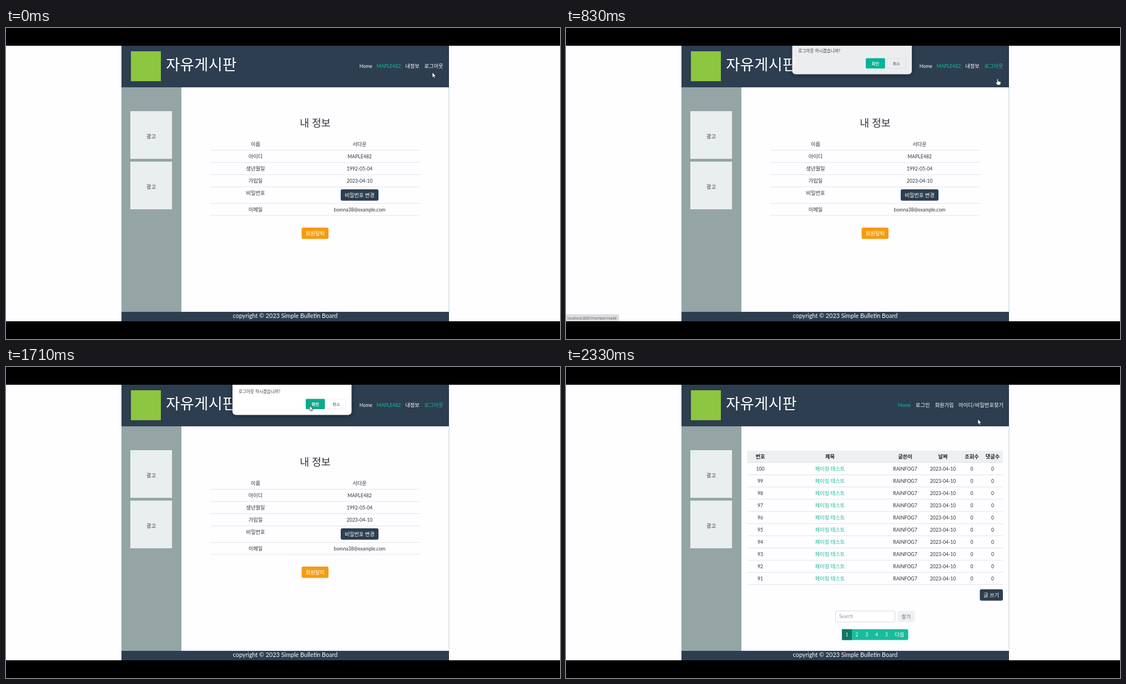
An HTML page for the animation above (2.37 s loop, 998 px wide and 561 px high).

```html
<!DOCTYPE html>
<html lang="ko">
<head>
<meta charset="utf-8">
<title>자유게시판</title>
<style>
html, body { margin: 0; width: 100%; height: 100%; overflow: hidden; background: #000; }
svg { display: block; width: 998px; height: 561px; }
text { font-family: Lato, "Noto Sans CJK KR", "Noto Sans CJK", "Noto Sans KR", sans-serif; white-space: pre; }
#dialog { filter: drop-shadow(0 2px 4px rgba(0, 0, 0, .4)); }
</style>
</head>
<body>
<svg id="stage" viewBox="0 0 998 561" xmlns="http://www.w3.org/2000/svg">
  <rect y="32" width="998" height="497" fill="#fefdff"/>
  <g id="frame"></g>
  <g id="info"></g>
  <g id="board"><g id="rows"></g><g id="tools"></g></g>
  <g id="dialog"></g>
  <g id="status"></g>
  <path d="M0 0H998V32H0ZM0 529H998V561H0Z"/>
  <path id="arrow" d="M0 0V9.4L2.1 7.5 3.5 10.8 5 10.1 3.6 7H6.5Z" fill="#fff" stroke="#111" stroke-width=".6"/>
  <path id="hand" d="M-1 .6Q0-.6 1 .6V4L4.6 4.8Q6 5.2 5.8 6.6L4.9 10.8H-.4L-3.4 6.8Q-3.6 5.4-2.2 5.8L-1 6.8Z" fill="#fff" stroke="#111" stroke-width=".5"/>
</svg>
<script>
const NAVY = '#2c3e50', TEAL = '#18bc9c', INK = '#303438', PALE = '#ecf0f1', WHITE = '#fff';
const LATIN = 8.65, HANGUL = 9.3;
const $ = id => document.getElementById(id);

function add(parent, tag, attrs) {
  const el = document.createElementNS('http://www.w3.org/2000/svg', tag);
  for (const key in attrs) el.setAttribute(key, attrs[key]);
  return $(parent).appendChild(el);
}
const rect = (parent, x, y, width, height, fill, more) =>
  add(parent, 'rect', { x, y, width, height, fill, ...more });

// y is the optical centre of the line
function label(parent, str, x, y, fill = INK, size, more) {
  size = size || (/[가-힣]/.test(str) ? HANGUL : LATIN);
  const el = add(parent, 'text', {
    x, y: y + size * .365, fill, 'font-size': size, 'text-anchor': 'middle', ...more
  });
  el.textContent = str;
  return el;
}
function button(parent, str, x, y, w, h, fill, color = WHITE) {
  rect(parent, x, y, w, h, fill, { rx: 3 });
  label(parent, str, x + w / 2, y + h / 2, color);
}
const rule = (parent, x, y, w) => rect(parent, x, y, w, 1, '#e3e5e8');
const start = { 'text-anchor': 'start' };

// Shared page frame
rect('frame', 208, 32, 590, 75, NAVY);
rect('frame', 208, 107, 108, 405, '#95a5a6');
rect('frame', 797.5, 107, 1, 405, '#c3cacc');
rect('frame', 208, 512, 590, 17, NAVY);
rect('frame', 225, 42, 54, 54, '#8dc63f');
label('frame', '자유게시판', 288, 66, WHITE, 27.7, start);
label('frame', 'copyright © 2023 Simple Bulletin Board', 503, 519.5, WHITE, 10.8);
for (const y of [150, 241]) {
  rect('frame', 224, y, 75, 86, '#e9eeee');
  label('frame', '광고', 261.5, y + 45.5);
}

// Member page
label('info', 'Home', 648.3, 69, WHITE);
label('info', 'MAPLE482', 689.5, 69, TEAL);
label('info', '내정보', 732, 69, WHITE);
const logout = label('info', '로그아웃', 770.5, 69, WHITE);
label('info', '내 정보', 557, 171, INK, 18.4);
const fields = [
  ['이름', '서다온', 209.5, 220], ['아이디', 'MAPLE482', 231.5, 242],
  ['생년월일', '1992-05-04', 253.5, 264], ['가입일', '2023-04-10', 275.5, 286],
  ['비밀번호', '', 297.5, 316], ['이메일', 'bomna38@example.com', 327.5, 337.5]
];
for (const [name, value, y, line] of fields) {
  label('info', name, 449.5, y);
  label('info', value, 637, y);
  rule('info', 368.5, line, 376.5);
}
button('info', '비밀번호 변경', 603, 291, 68, 20.5, NAVY);
button('info', '회원탈퇴', 532.5, 360, 48.5, 20.5, '#f39c12');

// Board page
label('board', 'Home', 609.6, 69, TEAL);
label('board', '로그인', 642.7, 69, WHITE);
label('board', '회원가입', 681.5, 69, WHITE);
label('board', '아이디/비밀번호찾기', 747.5, 69, WHITE);
rect('board', 326.5, 151, 460.5, 22, PALE);
rule('board', 326.5, 172, 460.5);
const cols = [350, 475.5, 611, 679, 731, 768.5];
['번호', '제목', '글쓴이', '날짜', '조회수', '댓글수'].forEach((s, i) =>
  label('board', s, cols[i], 161.5, '#222', HANGUL, { 'font-weight': 700 }));
for (let i = 0; i < 10; i++) {
  const y = 183.5 + i * 22;
  [100 - i, '페이징 테스트', 'RAINFOG7', '2023-04-10', 0, 0].forEach((s, c) =>
    label('rows', String(s), cols[c], y, c === 1 ? TEAL : INK));
  rule('rows', 326.5, y + 10.5, 460.5);
}
rect('rows', 497, 473, 119.5, 19.5, TEAL, { rx: 3 });
rect('rows', 497, 473, 18, 19.5, '#0f7864');
['1', '2', '3', '4', '5', '다음'].forEach((s, i) =>
  label('rows', s, i < 5 ? 506 + i * 17.9 : 601, 483, WHITE));
button('tools', '글 쓰기', 745.5, 181, 41.5, 20.5, NAVY);
rect('tools', 485.5, 220, 107, 20, WHITE, { rx: 3, stroke: '#d3d8dc', 'stroke-width': 1 });
label('tools', 'Search', 492, 230, '#8d9496', LATIN, start);
button('tools', '찾기', 597.5, 220, 30.5, 20.5, '#eff1f2', '#666c70');

// Confirm dialog
rect('dialog', 408, 0, 214.5, 86.5, WHITE, { rx: 6 });
label('dialog', '로그아웃 하시겠습니까?', 419, 44, '#3a3a3a', 7.6, start);
const ok = rect('dialog', 540, 57.5, 34.5, 18.5, '#00bfa0', { rx: 1.5 });
label('dialog', '확인', 557.3, 67, WHITE, 7.4, { 'font-weight': 700 });
rect('dialog', 578, 58, 34, 17.5, WHITE, { rx: 1.5, stroke: '#ededee', 'stroke-width': 1 });
label('dialog', '취소', 595, 67, '#444', 7.4);

// Link address bubble
rect('status', -2, 517, 97, 14, '#dcdde0', { stroke: '#c9cacd', 'stroke-width': .6 });
label('status', 'localhost:8087/member/read#', 3, 523.3, '#5a5c60', 6.2,
  { ...start, 'font-family': 'Open Sans, sans-serif', style: 'font-family: "Open Sans", sans-serif' });

// Steps: time, then values
const mouse = [
  [0, 768, 80], [130, 778, 66], [250, 787, 54], [330, 782.5, 58], [420, 778, 66], [500, 776, 70],
  [580, 776, 72], [750, 777.5, 92], [880, 777.5, 92], [960, 700, 72], [1080, 510, 42], [1170, 444, 37],
  [1290, 462, 42], [1460, 515, 60], [1630, 547, 69.5], [1790, 547, 69.5], [1920, 569, 76],
  [2040, 572, 110], [2170, 563, 142], [2210, 604, 123], [2250, 664, 106], [2290, 717, 97], [2330, 742, 94]
];
const popup = [
  [750, 0, -7], [790, .5, -5], [830, .91, -2.9], [880, .98, -1], [960, 1, 0],
  [1830, 1, 0], [1880, .9, -3], [1920, .66, -5], [1960, .25, -6.5], [2000, 0, -7]
];
const hover = [[290, 0], [330, .5], [420, 1]];
const bubble = [[290, 0], [330, 1], [1130, 1], [1170, .8], [1290, 0]];

function at(steps, t) {
  let i = steps.findIndex(s => s[0] > t);
  if (i === 0) return steps[0].slice(1);
  if (i < 0) return steps[steps.length - 1].slice(1);
  const a = steps[i - 1], b = steps[i], p = (t - a[0]) / (b[0] - a[0]);
  return a.slice(1).map((v, n) => v + (b[n + 1] - v) * p);
}
const show = (el, on) => el.setAttribute('display', on ? 'inline' : 'none');

function draw(t) {
  const [x, y] = at(mouse, t), [alpha, drop] = at(popup, t), [h] = at(hover, t);
  const onBoard = t >= 1880, loaded = t >= 1960, pointing = t >= 380 && t <= 880;
  show($('info'), !onBoard);
  show($('board'), onBoard);
  show($('rows'), loaded);
  $('tools').setAttribute('transform', `translate(0 ${loaded ? 220 : 0})`);

  const mix = (a, b) => Math.round(a + (b - a) * h);
  logout.setAttribute('fill', `rgb(${mix(255, 24)},${mix(255, 188)},${mix(255, 156)})`);
  ok.setAttribute('fill', t < 1590 ? '#00bfa0' : t < 1790 ? '#0aaa8d' : '#059079');

  const dialog = $('dialog'), scale = 1 - drop * .0015;
  show(dialog, alpha > 0);
  dialog.setAttribute('opacity', alpha);
  dialog.setAttribute('transform', `translate(${515.25 * (1 - scale)} ${drop}) scale(${scale} 1)`);
  $('status').setAttribute('opacity', at(bubble, t)[0] < 1 && t < 330 ? 0 : at(bubble, t)[0]);

  show($('arrow'), !pointing);
  show($('hand'), pointing);
  for (const id of ['arrow', 'hand']) $(id).setAttribute('transform', `translate(${x} ${y})`);
}

// 24 pictures a second, on a 10 ms grid
const LOOP = 2370;
let origin;
function tick(now) {
  origin ??= now;
  const k = Math.floor(((now - origin) % LOOP + 4.9) * .024);
  draw(Math.round(k * 100 / 24) * 10);
  requestAnimationFrame(tick);
}
draw(0);
requestAnimationFrame(tick);
</script>
</body>
</html>
```
